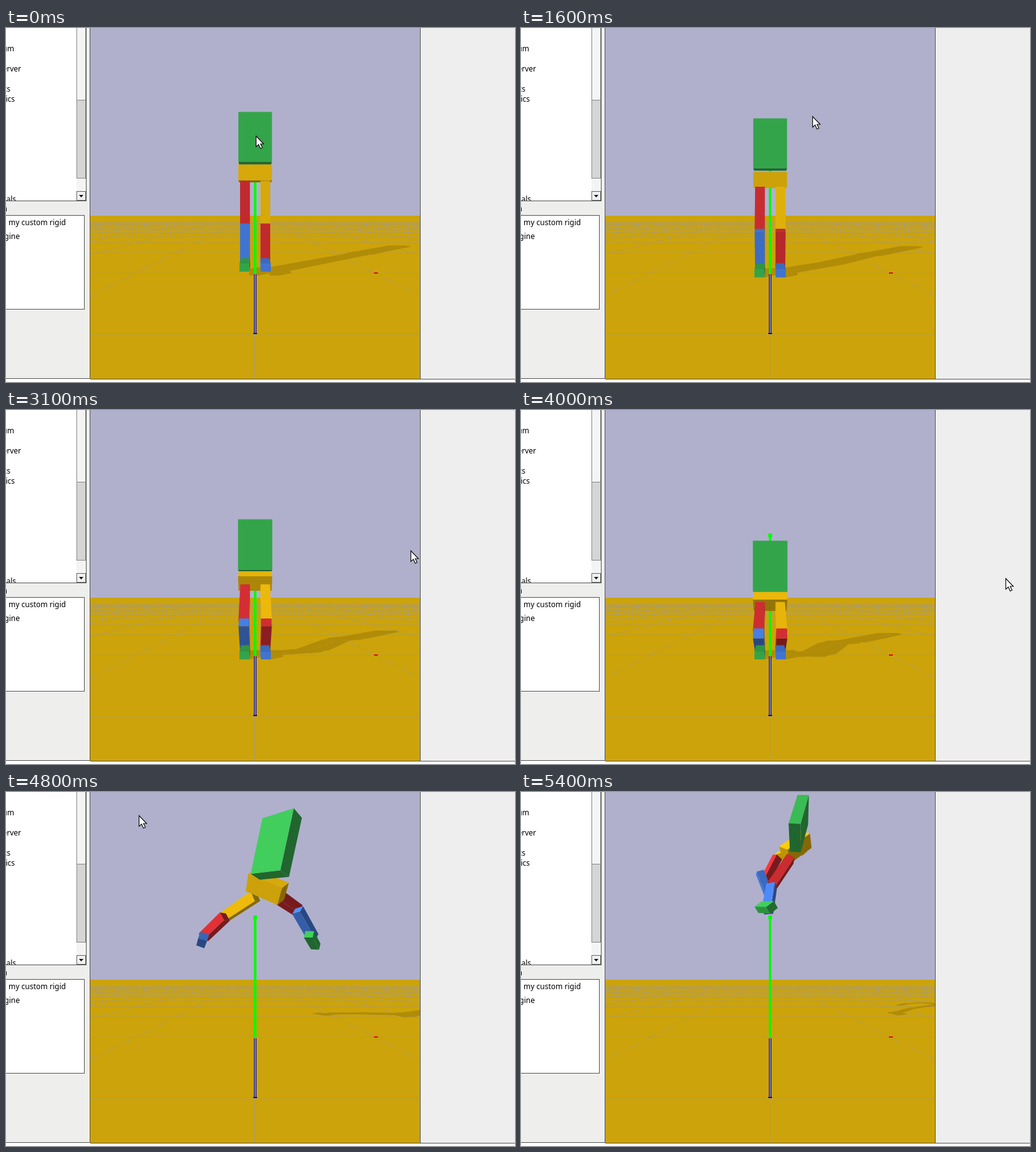
These frames come from a looping animation (809x562 px, 5.5 s). An HTML page with a canvas:

```html
<!DOCTYPE html>
<html lang="en">
<head>
<meta charset="utf-8">
<style>
  html, body { margin: 0; width: 100%; height: 100%; overflow: hidden; background: #eeeeec; }
  canvas { display: block; }
</style>
</head>
<body>
<canvas id="stage" width="809" height="562"></canvas>
<script>
const ctx = document.getElementById('stage').getContext('2d');
const LOOP = 5500, STEP = 100, START = 300, TAKEOFF = 4400, SPREAD = 4800, END = 5400;
const GREEN = [52, 164, 74], YELLOW = [214, 168, 10], RED = [192, 42, 46], BLUE = [64, 116, 208];
const THIGH = 67, SHIN = 59, FOOT = 12;

// World: x right, y up, z towards the viewer; the ground is y = 0
const CENTER_X = 396, HORIZON = 294, CAMERA = [0, 96, 384];
const LIGHT = [-.72, .43, .55];

// Flight poses: pelvis position, then directions
const SPREAD_POSE = {
  root: [14, 213, 38], side: [-.84, .1, -.53], chest: [-.75, .09, -.66],
  up: [.15, .6, .6], torso: [.21, .97, .05],
  thighL: [.62, -.11, -.79], shinL: [.54, -.66, -.5], toeL: [.45, -.35, -.8],
  thighR: [-.75, -.3, -.6], shinR: [-.7, -.48, -.52], toeR: [-.3, -.15, -.94]
};
const TUCK_POSE = {
  root: [48, 317, -50], side: [.75, .63, -.2], chest: [.18, -.12, -.97],
  up: [-.25, .55, .8], torso: [.23, .88, -.38],
  thighL: [-.5, -.83, .25], shinL: [-.11, -.84, .52], toeL: [-.45, .25, -.85],
  thighR: [-.68, .15, -.72], shinR: [-.48, -.87, -.1], toeR: [-.37, .93, 0]
};

// time, x, y
const CURSOR = [
  [800, 397, 171], [1400, 457, 135], [1600, 463, 140], [2000, 461, 136], [2600, 433, 212],
  [3100, 643, 223], [3800, 770, 267], [4400, 770, 267], [4800, 211, 37]
];

const add = (a, b, k = 1) => a.map((v, i) => v + b[i] * k);
const dot = (a, b) => a[0] * b[0] + a[1] * b[1] + a[2] * b[2];
const cross = (a, b) => [a[1] * b[2] - a[2] * b[1], a[2] * b[0] - a[0] * b[2], a[0] * b[1] - a[1] * b[0]];
const unit = a => a.map(v => v / Math.hypot(...a));
const mix = (a, b, u) => a.map((v, i) => v + (b[i] - v) * u);

function project([x, y, z]) {
  const s = CAMERA[2] / (CAMERA[2] - z);
  return [CENTER_X + x * s, HORIZON + (CAMERA[1] - y) * s];
}

const shadowOf = ([x, y, z]) =>
  [x - y * LIGHT[0] / LIGHT[1], 0, z - y * LIGHT[2] / LIGHT[1]];

function rect(color, x, y, w, h) {
  ctx.fillStyle = color;
  ctx.fillRect(x, y, w, h);
}

function polygon(color, points) {
  ctx.fillStyle = color;
  ctx.beginPath();
  for (const [x, y] of points) ctx.lineTo(x, y);
  ctx.closePath();
  ctx.fill();
}

function line(x1, y1, x2, y2, dash = []) {
  ctx.setLineDash(dash);
  ctx.beginPath();
  ctx.moveTo(x1, y1);
  ctx.lineTo(x2, y2);
  ctx.stroke();
  ctx.setLineDash([]);
}

// A box that runs from a point along a direction, as six faces
function makeBox(color, from, direction, length, side, width, depth) {
  const y = unit(direction);
  const x = unit(add(side, y, -dot(side, y)));
  const axes = [x, y, cross(x, y)], half = [width / 2, length / 2, depth / 2];
  const center = add(from, y, length / 2);
  const faces = [];
  for (let i = 0; i < 3; i++) {
    const j = (i + 1) % 3, k = (i + 2) % 3;
    for (const sign of [-1, 1]) {
      const middle = add(center, axes[i], sign * half[i]);
      const corners = [[1, 1], [1, -1], [-1, -1], [-1, 1]].map(([a, b]) =>
        add(add(middle, axes[j], a * half[j]), axes[k], b * half[k]));
      faces.push({ normal: axes[i].map(v => v * sign), middle, corners });
    }
  }
  return { color, center, faces };
}

function drawBox({ color, faces }) {
  for (const { normal, middle, corners } of faces) {
    if (dot(normal, add(CAMERA, middle, -1)) <= 0) continue;
    const shade = .62 + .69 * Math.max(0, dot(normal, LIGHT));
    polygon(`rgb(${color.map(c => Math.min(255, Math.round(c * shade)))})`, corners.map(project));
  }
}

function makeLeg(hip, side, thigh, shin, toe, colors) {
  const knee = add(hip, unit(thigh), THIGH), ankle = add(knee, unit(shin), SHIN);
  const sole = add(ankle, unit(cross(toe, side)), -FOOT / 2);
  return [
    makeBox(colors[0], hip, thigh, THIGH, side, 15, 15),
    makeBox(colors[1], knee, shin, SHIN, side, 15, 15),
    makeBox(colors[2], add(sole, unit(toe), -22), toe, 44, side, 15, FOOT)
  ];
}

// Drops to the floor, then sinks at a steady rate until it is thrown upwards
function crouch(t) {
  const bend = Math.max(0, t - 1100) * .02 * Math.PI / 180;
  const cos = Math.cos(bend), sin = Math.sin(bend);
  const fall = Math.max(0, 1 - (Math.max(0, t - START) / 1060) ** 2);
  const lift = 8.5 * fall + 68 * (Math.max(0, t - 4000) / 400) ** 2;
  const thigh = [0, -cos, sin], shin = [0, -cos, -sin], toe = [0, 0, 1];
  return {
    root: [0, FOOT + lift + (THIGH + SHIN) * cos, (SHIN - THIGH) * sin],
    side: [1, 0, 0], chest: [1, 0, 0],
    up: [0, Math.cos(bend * .75), Math.sin(bend * .75)], torso: [0, 1, 0],
    thighL: thigh, shinL: shin, toeL: toe, thighR: thigh, shinR: shin, toeR: toe
  };
}

function blend(a, b, u) {
  const pose = {};
  for (const key in a) pose[key] = mix(a[key], b[key], key === 'root' ? u : u * u);
  return pose;
}

function poseAt(t) {
  if (t <= TAKEOFF) return crouch(t);
  if (t <= SPREAD) return blend(crouch(TAKEOFF), SPREAD_POSE, (t - TAKEOFF) / (SPREAD - TAKEOFF));
  return blend(SPREAD_POSE, TUCK_POSE, (t - SPREAD) / (END - SPREAD));
}

// Trunk and legs as groups of boxes, farthest first
function makeFigure(p) {
  const side = unit(p.side), up = unit(p.up), torso = unit(p.torso);
  const chestBase = add(add(p.root, up, 25), torso, 4);
  const trunk = [
    makeBox(YELLOW, p.root, up, 25, side, 52, 22),
    makeBox(GREEN, chestBase, torso, 77, p.chest, 52, 20)
  ];
  const left = makeLeg(add(p.root, side, -16), side, p.thighL, p.shinL, p.toeL, [RED, BLUE, GREEN]);
  const right = makeLeg(add(p.root, side, 16), side, p.thighR, p.shinR, p.toeR, [YELLOW, RED, BLUE]);
  const depth = group => group.reduce((sum, box) => sum + box.center[2], 0) / group.length;
  return [trunk, left, right].sort((a, b) => depth(a) - depth(b)).flat();
}

function drawGround() {
  rect('#b0b0cc', 134, 0, 524, 298);
  rect('#cca30a', 134, 298, 524, 259);
  ctx.strokeStyle = '#a59a80';
  ctx.lineWidth = 1;
  for (let n = 1; n <= 12; n++) {
    const y = Math.round(HORIZON + 192 / n) - .5;
    line(134, y, 658, y, n > 3 && n % 2 ? [3, 3] : []);
  }
  for (let k = 1; k <= 8; k++) {
    for (const side of [-1, 1]) {
      line(CENTER_X + side * 32 * k, 310, CENTER_X + side * 263, HORIZON + 131.5 / k, [2, 2]);
    }
  }
  line(395.5, 390, 395.5, 557);
}

function drawAxes() {
  rect('#00ff00', 394, 199, 4, 191);
  rect('#00ff00', 393, 196, 6, 6);
  rect('#0000b4', 394, 391, 4, 95);
  rect('#8c8ca0', 395, 391, 2, 93);
  rect('#0000e0', 393, 484, 6, 2);
  rect('#e60000', 585, 388, 6, 2);
}

function label(text, x, y, align = 'right') {
  ctx.fillStyle = '#000';
  ctx.font = '12px "Noto Sans", sans-serif';
  ctx.textAlign = align;
  ctx.fillText(text, x, y);
}

function drawPanels() {
  const edge = '#555', panel = '#eeeeec';
  rect(panel, 0, 0, 134, 557);
  rect('#eeeeee', 658, 0, 151, 557);
  rect('#fff', 0, 0, 112, 274);
  label('um', 13, 37);
  label('erver', 24, 69);
  label('cs', 7, 101);
  label('ics', 14, 117);
  label('ials', 16, 276);
  rect('#f4f4f4', 112, 0, 15, 274);
  rect('#888', 112, 0, 15, 239);
  rect('#f4f4f4', 113, 0, 13, 114);
  rect('#d5d5d5', 113, 115, 13, 123);
  rect('#666', 112, 259, 15, 15);
  rect('#f0f0f0', 113, 260, 13, 13);
  polygon('#111', [[116, 265], [123, 265], [119.5, 269]]);
  rect(panel, 0, 274, 133, 23);
  rect(edge, 127, 0, 1, 275);
  rect(edge, 0, 274, 128, 1);
  label('n', 2, 291);
  rect(edge, 0, 297, 125, 150);
  rect('#fff', 0, 298, 124, 148);
  label('my custom rigid', 4, 313, 'left');
  label('gine', 22, 335);
  rect(edge, 133, 0, 1, 557);
  rect(edge, 658, 0, 1, 557);
  rect('#fff', 0, 557, 809, 5);
  rect(edge, 0, 556, 134, 1);
  rect(edge, 134, 557, 675, 1);
}

function cursorAt(t) {
  const next = Math.max(1, CURSOR.findIndex(key => key[0] >= t));
  const a = CURSOR[next - 1], b = CURSOR[next];
  return mix(a, b, Math.max(0, (t - a[0]) / (b[0] - a[0]))).slice(1);
}

function drawCursor(t) {
  if (t > SPREAD) return;
  const [x, y] = cursorAt(t);
  const arrow = [[0, 0], [0, 17], [4, 13.5], [7, 20], [10, 18.5], [7, 12.5], [12, 12.5]];
  polygon('#fff', arrow.map(p => [p[0] + x + .5, p[1] + y + .5]));
  ctx.strokeStyle = '#111';
  ctx.lineWidth = 1.2;
  ctx.stroke();
}

function draw(t) {
  const figure = makeFigure(poseAt(t));
  drawGround();
  for (const { faces } of figure) {
    for (const { corners } of faces) polygon('#b18c08', corners.map(c => project(shadowOf(c))));
  }
  drawAxes();
  figure.forEach(drawBox);
  drawPanels();
  drawCursor(t);
}

function frame(now) {
  const t = Math.floor(now % LOOP / STEP) * STEP;
  draw(t < START ? 0 : t);
  requestAnimationFrame(frame);
}
requestAnimationFrame(frame);
</script>
</body>
</html>
```
